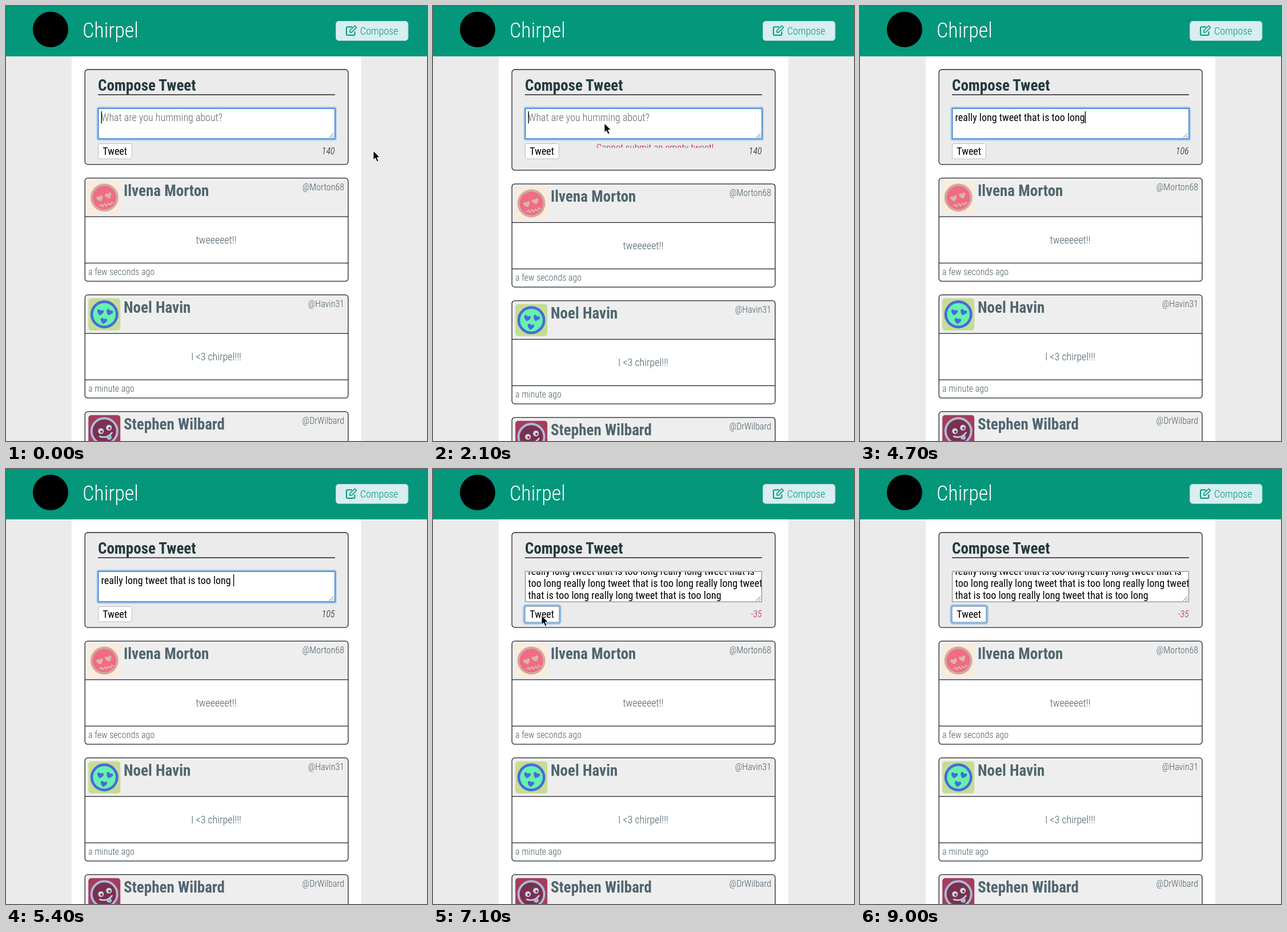
These frames come from a looping animation (737x760 px, 9.1 s). An HTML page:

```html
<!DOCTYPE html>
<html lang="en">
<head>
<meta charset="utf-8">
<title>Compose form</title>
<style>
html, body { margin: 0; width: 100%; height: 100%; overflow: hidden; background: #ebebeb; }
svg { display: block; }
text { font: 350 18px "Roboto Condensed", Roboto, sans-serif; font-stretch: 75%; white-space: pre; fill: #485e68; }
.logo { font-size: 36px; font-weight: 300; fill: #fff; }
.title { font-size: 27px; font-weight: 700; fill: #50666f; }
.small { font-size: 16px; }
.mid { text-anchor: middle; }
.end { text-anchor: end; }
.dark { fill: #243a3f; }
.black { font-weight: 400; fill: #000; }
.hint { fill: #626262; }
.teal { fill: #03967b; }
.error { font-size: 17px; fill: #bd1a3f; }
.count { font-style: italic; }
.line { fill: none; stroke: #222; stroke-width: 1.3; }
</style>
</head>
<body>
<svg id="stage" width="737" height="760" viewBox="0 0 737 760"><text id="probe">really long tweet that is too long</text></svg>
<script>
const LOOP = 9100, PHRASE = 'really long tweet that is too long ';
const stage = document.getElementById('stage');
const $ = id => document.getElementById(id);

// Narrow all text alike when no condensed face is available.
const narrow = $('probe').getComputedTextLength() > 235 ? 0.88 : 1;

const text = (x, y, s, cls = '', id = '') =>
  `<text id="${id}" class="${cls}" transform="translate(${x} ${y}) scale(${narrow} 1)">${s}</text>`;
const rect = (x, y, w, h, fill, r = 0, more = '') =>
  `<rect x="${x}" y="${y}" width="${w}" height="${h}" rx="${r}" fill="${fill}" ${more}/>`;
const circle = (x, y, r, fill, more = '') =>
  `<circle cx="${x}" cy="${y}" r="${r}" fill="${fill}" ${more}/>`;
const path = (d, more) => `<path d="${d}" ${more}/>`;
const heart = (x, y, turn, fill) =>
  path('M0 6C-10-1-5-7 0-2.5C5-7 10-1 0 6Z', `fill="${fill}" transform="translate(${x} ${y}) rotate(${turn})"`);
const ring = (id, x, y, w, h, r, color) => `<g id="${id}">` +
  rect(x - 1, y - 1, w + 2, h + 2, 'none', r + 1, 'stroke="#94bfea" stroke-width="4" opacity=".75"') +
  rect(x, y, w, h, 'none', r, `stroke="${color}" stroke-width="1.8"`) + '</g>';

// Avatars, drawn around their centres
const faces = [
  rect(-28, -28, 56, 56, '#fbecd8', 5) + circle(0, 0, 24.5, '#cfaaa8') + circle(0, 0, 20.5, '#f16b83') +
    heart(-8, 1, -18, '#d6b7a9') + heart(7, -4, -18, '#d6b7a9') +
    path('M-9 15l4-3 2 4 4-5 3 4 3-5 4 3 2-5 3 2', 'fill="none" stroke="#d6b7a9" stroke-width="2"'),
  rect(-28, -28, 56, 56, '#c5dc95', 5) + circle(0, 0, 24.5, '#496bd9') + circle(0, 0, 19.8, '#66f1ae') +
    heart(-7, -4, 12, '#496bd9') + heart(9, -4, 24, '#496bd9') + heart(-1, 11, 12, '#496bd9'),
  rect(-28, -28, 56, 56, '#a63c5e', 5) + circle(0, 0, 22.5, '#7b304e', 'stroke="#a9bad6" stroke-width="4"') +
    circle(-6, 0, 5, '#c9d6e8') + circle(8, -6, 5, '#c9d6e8') +
    circle(-5, 1, 2, '#7b304e') + circle(9, -5, 2, '#7b304e') +
    path('M-9 9Q5 14 14 2', 'fill="none" stroke="#c9d6e8" stroke-width="2.5"') +
    path('M3 10L11 6Q15 13 10 15Q5 16 3 10Z', 'fill="#a9bad6"')
];

const card = ([name, handle, body, age], i) => `<g transform="translate(0 ${300.7 + 204 * i})">` +
  rect(138.2, 0, 460.8, 180.2, '#fff', 5) +
  path('M138.2 67V5q0-5 5-5H594q5 0 5 5V67Z', 'fill="#eeeeee"') +
  rect(138.2, 0, 460.8, 180.2, 'none', 5, 'class="line"') +
  path('M138.2 67.5H599M138.2 148.5H599', 'class="line"') +
  `<g transform="translate(172.2 34)">${faces[i]}</g>` +
  text(206, 30.8, name, 'title') + text(592, 21.3, handle, 'small end') +
  text(368, 113.8, body, 'mid') + text(144, 169.3, age, 'small') + '</g>';

const cards = [
  ['Ilvena Morton', '@Morton68', 'tweeeeet!!', 'a few seconds ago'],
  ['Noel Havin', '@Havin31', 'I &lt;3 chirpel!!!', 'a minute ago'],
  ['Stephen Wilbard', '@DrWilbard', '', '']
];

stage.innerHTML =
  `<clipPath id="field">${rect(162, 180, 413, 51.5, '#000')}</clipPath>` +
  `<clipPath id="slot"><rect id="slotBox" x="225" y="236" width="325" height="0"/></clipPath>` +
  rect(0, 0, 737, 760, '#ebebeb') + rect(115, 88, 507, 672, '#fff') + rect(0, 0, 737, 88, '#04977c') +
  circle(78, 41, 31, '#000') + text(134, 55, 'Chirpel', 'logo') +
  rect(577.5, 26.5, 126.5, 34, '#d8eef0', 5, 'stroke="#9ccbd0"') +
  path('M606 36.5H598q-2 0-2 2V49q0 2 2 2h10.5q2 0 2-2V44.5', 'fill="none" stroke="#03967b" stroke-width="2"') +
  path('M602 46v-3.5l8.5-8 3 3-8.5 8.5Z', 'fill="none" stroke="#03967b" stroke-width="1.6"') +
  text(620, 49.5, 'Compose', 'teal') +
  `<rect id="form" class="line" x="138.2" y="111" width="460.8" height="165.8" rx="5" style="fill:#ebebeb"/>` +
  text(161, 147.5, 'Compose Tweet', 'title dark') + path('M161 155H576', 'class="line"') +
  rect(161.5, 179, 414, 53, '#fff', 0, 'stroke="#777"') +
  ring('fieldRing', 161.5, 178.8, 414.5, 53.4, 1, '#4c8bd6') +
  `<g clip-path="url(#field)"><rect id="marked" x="166.5" y="184" height="21" fill="#e3a8fb"/>` +
  text(166.5, 201, 'What are you humming about?', 'hint', 'hint') +
  `<g id="lines">${[0, 1, 2].map(i => text(166.5, 201 + 21 * i, '', 'black', 'line' + i)).join('')}` +
  `<rect id="caret" width="1.4" height="21"/></g></g>` +
  path('M565.5 230.5l8-8M570 230.5l3.5-3.5', 'stroke="#666" stroke-width="1" fill="none"') +
  rect(161.5, 240.5, 59, 26.5, '#fff', 3, 'stroke="#bdbdbd"') +
  ring('buttonRing', 160.2, 239.2, 61.8, 29.6, 3, '#74a9dc') +
  text(190.7, 259.5, 'Tweet', 'mid black') +
  `<g clip-path="url(#slot)">${text(388.7, 253, '', 'mid error', 'error')}</g>` +
  text(575.5, 258.5, '140', 'small end count', 'count') +
  `<g id="cards">${cards.map(card).join('')}</g>` +
  path('M0 0V16L3.7 12.7 6.4 19 9.2 17.8 6.5 11.6H11.4Z', 'id="pointer" stroke="#fff" stroke-width="1"');

const clamp = v => Math.min(1, Math.max(0, v));
const swing = v => 0.5 - Math.cos(Math.PI * clamp(v)) / 2;
const show = (id, on) => $(id).setAttribute('visibility', on ? 'visible' : 'hidden');

// Time, x, y
const route = [
  [0, 643, 253], [100, 643, 253], [500, 190, 256], [600, 190, 256], [900, 15, 268], [1100, 28, 265],
  [1500, 28, 265], [1900, 300, 205], [6700, 300, 205], [7000, 190, 256], [7200, 190, 256],
  [7500, 78, 231], [8300, 78, 231], [8800, 120, 770], [LOOP, 120, 770]
];
function pointerAt(t) {
  const i = route.findIndex(p => p[0] > t), a = route[i - 1], b = route[i];
  const f = swing((t - a[0]) / (b[0] - a[0]));
  return [a[1] + (b[1] - a[1]) * f, a[2] + (b[2] - a[2]) * f];
}

function typed(t) {
  if (t < 4800) return PHRASE.slice(0, clamp((t - 2320) / 2380) * 34 + 1e-6);
  return PHRASE.repeat(1 + [6350, 6450, 6550, 6650].filter(at => t >= at).length);
}

// The message slides open after each click and closes again.
const slide = (t, click) => swing((t - click) / 400) - swing((t - click - 1400) / 400);

function draw(t) {
  const value = typed(t), left = 140 - value.length;
  const inField = t < 500 || (t >= 2000 && t < 7100);
  const selected = t >= 5500 && t < 6200;
  const rows = value.match(/.{1,62}(\s|$)/g) || [''];
  const open = slide(t, 500) + slide(t, 7100);

  for (let i = 0; i < 3; i++) $('line' + i).textContent = rows[i] || '';
  $('lines').setAttribute('transform', `translate(0 ${rows.length > 2 ? -16.5 : 0})`);
  show('hint', !value);
  const last = rows.length - 1;
  const width = value ? $('line' + last).getComputedTextLength() * narrow : 0;
  $('caret').setAttribute('x', 166.5 + width);
  $('caret').setAttribute('y', 184 + 21 * last);
  const busy = t > 2300 && t < 4900;
  show('caret', inField && !selected && (busy || Math.floor(t / 500) % 2 === 0));
  $('marked').setAttribute('width', width);
  show('marked', selected);
  show('fieldRing', inField);
  show('buttonRing', !inField);

  $('count').textContent = left;
  $('count').style.fill = left < 0 ? '#bd1a3f' : '#111';
  $('error').textContent = t < 5000 ? 'Cannot submit an empty tweet!' : 'Cannot submit tweet exceeding 140 characters!';
  $('slotBox').setAttribute('height', 24 * open);
  $('form').setAttribute('height', 165.8 + 20.3 * open);
  $('cards').setAttribute('transform', `translate(0 ${20.3 * open})`);

  $('pointer').setAttribute('transform', `translate(${pointerAt(t)})`);
  show('pointer', t < 2300 || t >= 6700);
}

const start = performance.now();
function tick() {
  draw(Math.floor(((performance.now() - start) % LOOP) / 100) * 100);
  requestAnimationFrame(tick);
}
tick();
</script>
</body>
</html>
```
